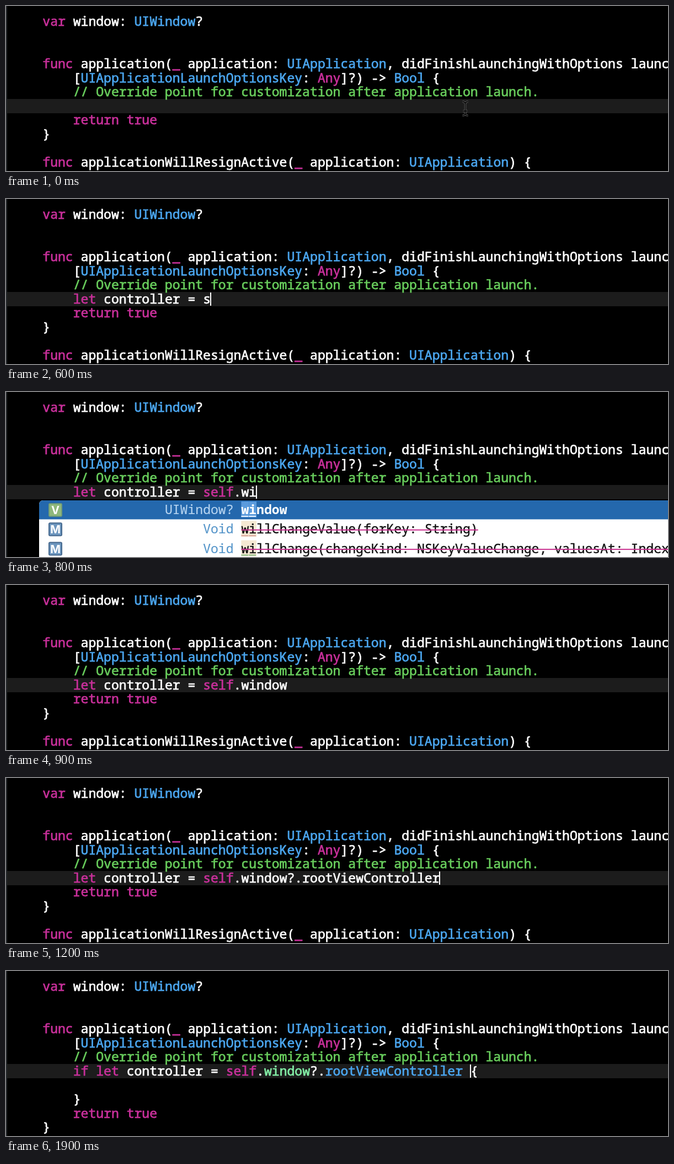
Animation of 1200 by 300 pixels, one loop 2 s. Source, as an HTML page with a canvas:

```html
<!DOCTYPE html>
<html lang="en">
<head>
<meta charset="utf-8">
<title>Code editor typing</title>
<style>
  html, body { margin: 0; width: 100%; height: 100%; overflow: hidden; background: #000; }
  canvas { display: block; width: 100%; height: 100%; }
</style>
</head>
<body>
<canvas id="stage" width="1200" height="300"></canvas>
<script>
const ctx = document.getElementById('stage').getContext('2d');
const LOOP = 2000, STEP = 100;
const LEFT = 66.3, CHAR = 13.85, LINE = 25.6, FIRST_BASELINE = 36.2;
const EDIT_LINE = 6, INDENT = 4;
const MONO = '"Noto Sans Mono", "DejaVu Sans Mono", monospace';
const FONT = `23.083px ${MONO}`;
const BOLD = `700 23.083px ${MONO}`;
const COLOR = {
  plain: '#fff', keyword: '#c9309b', type: '#4ba6ef', comment: '#68cc5c',
  project: '#83eea6', current: '#1c1c1c'
};

const HEAD = [
  'var window: UIWindow?', '', '',
  'func application(_ application: UIApplication, didFinishLaunchingWithOptions launchOptions:',
  '    [UIApplicationLaunchOptionsKey: Any]?) -> Bool {',
  '    // Override point for customization after application launch.'
];
const TAIL = ['    return true', '}', '', 'func applicationWillResignActive(_ application: UIApplication) {'];

const PREFIX = 'let controller = ';
const CHAIN = 'self.window?.rootViewController';
const FULL = PREFIX + CHAIN;

const POPUPS = {
  window: {
    left: 60, col: 26, struck: true,
    rows: [
      ['V', 'UIWindow?', 'window', [0, 1]],
      ['M', 'Void', 'willChangeValue(forKey: String)', [0, 1]],
      ['M', 'Void', 'willChange(changeKind: NSKeyValueChange, valuesAt: IndexSet', [0, 1]]
    ]
  },
  root: {
    left: 42, col: 33, struck: false,
    rows: [
      ['V', 'UIViewController?', 'rootViewController', [0, 1, 2]],
      ['M', 'Any?', 'replacementObject(for: NSCoder)', [0, 11, 19]],
      ['M', 'Any?', 'replacementObject(for: NSKeyedArchiver)', [0, 11, 19]]
    ]
  }
};

const columnX = col => LEFT + col * CHAR;
const baseline = line => FIRST_BASELINE + line * LINE;

function rect(x, y, w, h, color) {
  ctx.fillStyle = color;
  ctx.fillRect(x, y, w, h);
}

// A thin outline thickens the regular weight to a medium one.
function text(str, x, y, color, { font = FONT, outline = 0 } = {}) {
  ctx.font = font;
  ctx.fillStyle = ctx.strokeStyle = color;
  ctx.fillText(str, x, y);
  if (outline) {
    ctx.lineWidth = outline;
    ctx.lineJoin = 'round';
    ctx.strokeText(str, x, y);
  }
}

function tokenColor(token, resolved) {
  if (token.startsWith('//')) return COLOR.comment;
  if (/^(var|func|let|if|self|return|true|Any|_)$/.test(token)) return COLOR.keyword;
  if (/^(UI\w+|Bool)$/.test(token)) return COLOR.type;
  if (resolved && token === 'window') return COLOR.project;
  if (resolved && token === 'rootViewController') return COLOR.type;
  return COLOR.plain;
}

function codeLine(str, line, resolved = false) {
  for (const match of str.matchAll(/\/\/.*|\w+|[^\w\s]+/g)) {
    text(match[0], columnX(match.index), baseline(line), tokenColor(match[0], resolved), { outline: 0.75 });
  }
}

// What the edited line holds at each 100 ms step.
function editorState(step) {
  if (step === 0) return { code: '', pointer: true };
  if (step <= 8) {
    const code = (PREFIX + 'self.wi').slice(0, step * 3);
    return { code, caret: code.length, popup: step === 8 && POPUPS.window };
  }
  if (step === 9) return { code: PREFIX + 'self.window' };
  if (step <= 11) {
    const code = PREFIX + (step === 10 ? 'self.window.' : 'self.window.roo');
    return { code, caret: code.length, popup: step === 11 && POPUPS.root };
  }
  if (step <= 15) return { code: FULL, resolved: step > 13, caret: step < 15 ? FULL.length : undefined };
  const code = 'if ' + FULL;
  if (step === 16) return { code, resolved: true, caret: 3 };
  const opened = { code: code + ' {', resolved: true, block: true };
  if (step === 17) return { ...opened, current: EDIT_LINE + 1, caret: 4 };
  return { ...opened, caret: code.length + (step === 18 ? 2 : 1) };
}

function drawPointer(x, y) {
  const beam = new Path2D(`M${x - 5} ${y - 12}q5 0 5 4v17q0 4-5 4M${x + 5} ${y - 12}q-5 0-5 4v17q0 4 5 4M${x - 4} ${y + 5}h8`);
  ctx.strokeStyle = '#6c6c6c';
  ctx.lineWidth = 3.4;
  ctx.stroke(beam);
  ctx.strokeStyle = '#080808';
  ctx.lineWidth = 1.8;
  ctx.stroke(beam);
}

function drawIcon(letter, x, y) {
  ctx.beginPath();
  ctx.roundRect(x, y, 25, 25, 3);
  ctx.fillStyle = letter === 'V' ? '#6f9a78' : '#46698e';
  ctx.fill();
  rect(x + 2, y + 2, 21, 21, letter === 'V' ? '#8fb87c' : '#6d96be');
  ctx.textAlign = 'center';
  text(letter, x + 12.5, y + 20, '#fff', { font: '700 20px Inter, sans-serif' });
  ctx.textAlign = 'left';
}

function drawPopup({ left, col, rows, struck }) {
  const top = 197, x = columnX(col);
  ctx.save();
  ctx.beginPath();
  ctx.roundRect(left, top, 1300, 200, 7);
  ctx.clip();
  rect(left, top, 1300, 200, '#fff');
  rect(left, top, 1300, 34.5, '#2468ad');
  rows.forEach(([icon, type, name, matches], i) => {
    const y = 222 + i * 35.3, selected = i === 0;
    for (const m of matches) {
      rect(x + m * CHAR, y - 23, CHAR, 29, selected ? '#5b9bdd' : '#f6e9d3');
      rect(x + m * CHAR, y + 3, CHAR - 1, 2, ['#e8f3ff', '#d9a39a', '#83b77c'][i]);
    }
    drawIcon(icon, left + 17, y - 20);
    text(type, x - (type.length + 1) * CHAR, y, selected ? '#b5d3f0' : '#5796ca', { outline: 0.2 });
    text(name, x, y, selected ? '#fff' : '#111', selected ? { font: BOLD } : { outline: 0.4 });
    if (struck && !selected) rect(x, y - 7.5, name.length * CHAR, 2, '#c9308f');
  });
  ctx.restore();
}

function draw(time) {
  const state = editorState(Math.floor((time % LOOP) / STEP));
  const current = state.current ?? EDIT_LINE;
  rect(0, 0, 1200, 300, '#000');
  rect(0, 0, 2, 300, '#26292d');
  rect(2, Math.round(15.4 + current * LINE), 1198, 26, COLOR.current);

  const body = state.block ? ['', '    }'] : [];
  const lines = [...HEAD, ' '.repeat(INDENT) + state.code, ...body, ...TAIL];
  lines.forEach((line, i) => codeLine(line, i, i === EDIT_LINE && state.resolved));

  if (state.caret !== undefined) {
    rect(Math.round(columnX(INDENT + state.caret)) - 1, 170 + (current - EDIT_LINE) * LINE, 2, 24, '#fff');
  }
  if (state.pointer) drawPointer(832.5, 186);
  if (state.popup) drawPopup(state.popup);
}

function tick() {
  draw(performance.now());
  requestAnimationFrame(tick);
}
tick();
</script>
</body>
</html>
```
